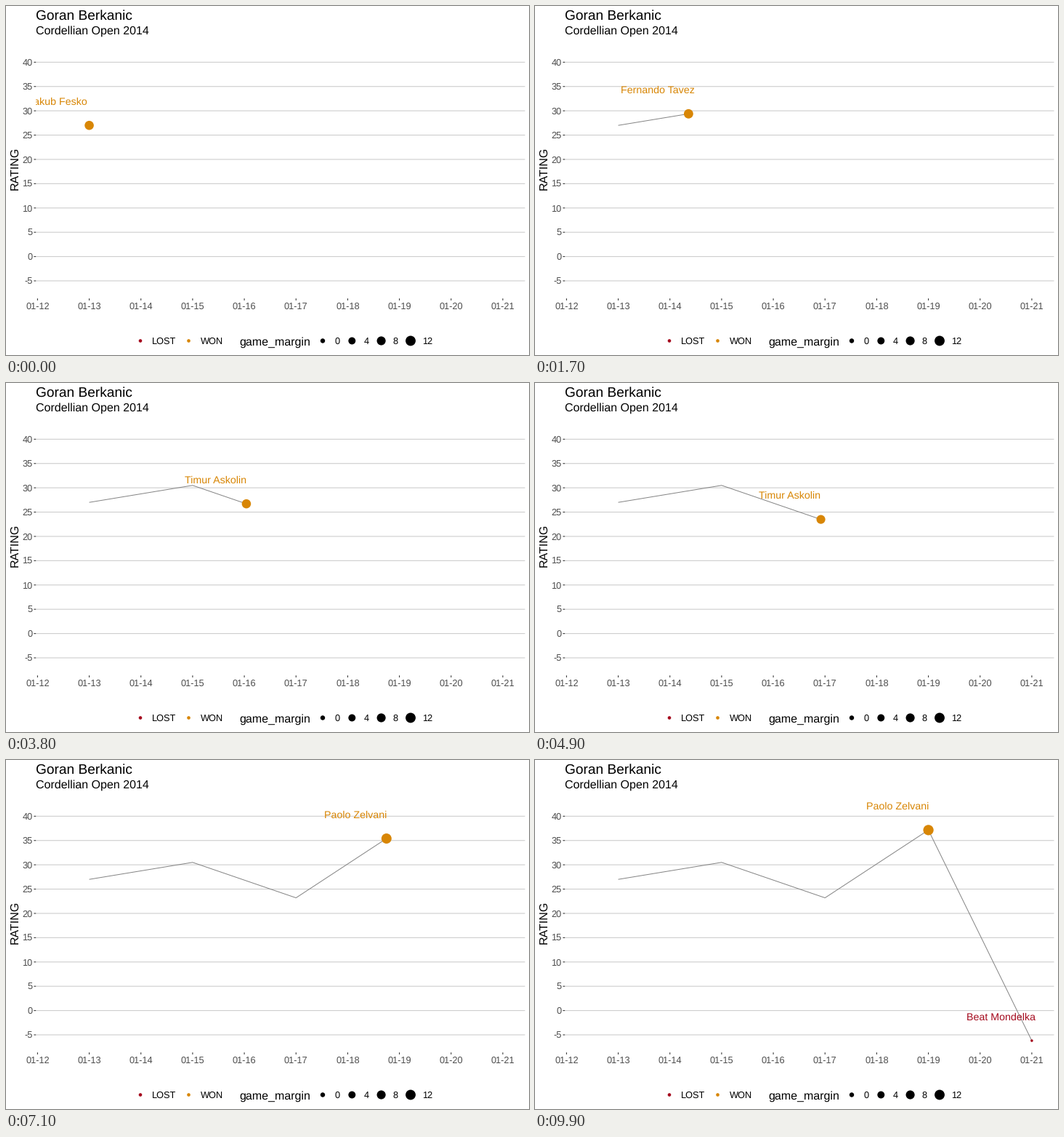
Write a matplotlib script that moves like this. It is 720 px wide and 480 px high and loops after 10 s.

```python
import numpy as np
import matplotlib.pyplot as plt
from matplotlib.animation import FuncAnimation
from matplotlib.patches import Circle, Rectangle

W, H, DPI = 720, 480, 100
FRAMES, INTERVAL = 100, 100
WON, LOST = "#d88605", "#a50b1e"
INK, TICK, AXIS_TEXT = "#000000", "#333333", "#4d4d4d"
GRID, TRAIL = "#cccccc", "#858585"
LEFT, RIGHT, TOP, BOTTOM = 41.2, 714.5, 46.6, 402.2
DAY, UNIT = 71.17, 6.682

# One entry per match
KEYS = [0, 25, 50, 74, 99]
DAYS = [13, 15, 17, 19, 21]
RATINGS = [27, 30.5, 23.2, 37.15, -6.2]
MARGINS = [9, 10, 8, 13, -1]
RIVALS = ["Jakub Fesko", "Fernando Tavez", "Timur Askolin",
          "Paolo Zelvani", "Beat Mondelka"]
LAST_WIN, END = KEYS[3], KEYS[4]

plt.rcParams["font.family"] = "Liberation Sans"
plt.rcParams["text.hinting"] = "none"


def pt(px):
    return px * 72 / DPI


def x_of(day):
    return 43.4 + DAY * (day - 12)


def y_of(rating):
    return 344.6 - UNIT * rating


def diameter(size):
    return 0.75 * (size * 2.845 + 0.945) + 0.71


def margin_size(margin):
    low, high = min(MARGINS), max(MARGINS)
    return 1 + 5 * np.sqrt((np.asarray(margin) - low) / (high - low))


fig = plt.figure(figsize=(W / DPI, H / DPI), dpi=DPI, facecolor="white")
ax = fig.add_axes([0, 0, 1, 1])
ax.set_xlim(0, W)
ax.set_ylim(H, 0)
ax.axis("off")
panel = Rectangle((LEFT, TOP), RIGHT - LEFT, BOTTOM - TOP, fill=False, ec="none")
ax.add_patch(panel)


def text(x, y, s, px, color=INK, ha="left", **kw):
    return ax.text(x, y, s, fontsize=pt(px), color=color, ha=ha,
                   va="baseline", **kw)


def line(xs, ys, color, px, **kw):
    return ax.plot(xs, ys, color=color, lw=pt(px), snap=False,
                   solid_capstyle="butt", **kw)[0]


def dot(x, y, size, color):
    return ax.add_patch(Circle((x, y), diameter(size) / 2, fc=color,
                               ec="none", zorder=4))


def rival_label(color):
    label = text(0, 0, "", 14.23, color, "center", zorder=5, clip_on=True)
    label.set_clip_path(panel)
    return label


def place_label(label, x, y, name):
    label.set_position((x - 0.6 * DAY, y - 5 * UNIT + 5.1))
    label.set_text(name)


# Titles and axes
text(LEFT, 19, "Goran Berkanic", 19.2)
text(LEFT, 38.2, "Cordellian Open 2014", 16)
text(17, 223.2, "RATING", 16, ha="center", rotation=90, rotation_mode="anchor")
for v in range(-5, 41, 5):
    y = y_of(v)
    line([LEFT, RIGHT], [y, y], GRID, 1.07, zorder=1)
    line([38.4, LEFT], [y, y], TICK, 1.07, zorder=2)
    text(36.4, y + 4.6, str(v), 12.8, AXIS_TEXT, "right")
for d in range(12, 22):
    x = x_of(d)
    line([x, x], [BOTTOM, BOTTOM + 2.75], TICK, 1.07, zorder=2)
    text(x, 417, f"01-{d}", 12.8, AXIS_TEXT, "center")

# Legends
for x, name, color in [(185, "LOST", LOST), (251.5, "WON", WON)]:
    dot(x, 460.5, 1.5, color)
    text(x + 16.3, 465.2, name, 12.8)
text(321, 466.8, "game_margin", 16)
for x, m in [(436, 0), (476.3, 4), (516.6, 8), (557, 12)]:
    dot(x, 460.5, margin_size(m), INK)
    text(x + 16.3, 465.2, str(m), 12.8)

# Moving parts
PX = x_of(np.array(DAYS))
PY = y_of(np.array(RATINGS))
SIZES = margin_size(MARGINS)

trail = line([], [], TRAIL, 1, zorder=3)
win_dot = dot(PX[0], PY[0], SIZES[0], WON)
win_label = rival_label(WON)
loss_dot = dot(PX[-1], PY[-1], SIZES[-1], LOST)
loss_label = rival_label(LOST)
place_label(loss_label, PX[-1], PY[-1], RIVALS[-1])


def at(frame, values):
    return float(np.interp(frame, KEYS, values))


def update(frame):
    done = sum(k <= frame for k in KEYS)
    trail.set_data([*PX[:done], at(frame, PX)], [*PY[:done], at(frame, PY)])

    f = min(frame, LAST_WIN)
    x, y = at(f, PX), at(f, PY)
    win_dot.center = x, y
    win_dot.set_radius(diameter(at(f, SIZES)) / 2)
    # The name switches halfway between two matches
    nearest = int(np.floor(at(f, range(len(KEYS))) + 0.5))
    place_label(win_label, x, y, RIVALS[nearest])

    lost = frame >= END
    loss_dot.set_visible(lost)
    loss_label.set_visible(lost)
    return trail, win_dot, win_label, loss_dot, loss_label


anim = FuncAnimation(fig, update, frames=FRAMES, interval=INTERVAL,
                     init_func=lambda: update(0), repeat=True,
                     repeat_delay=0, blit=False)
plt.show()
```
